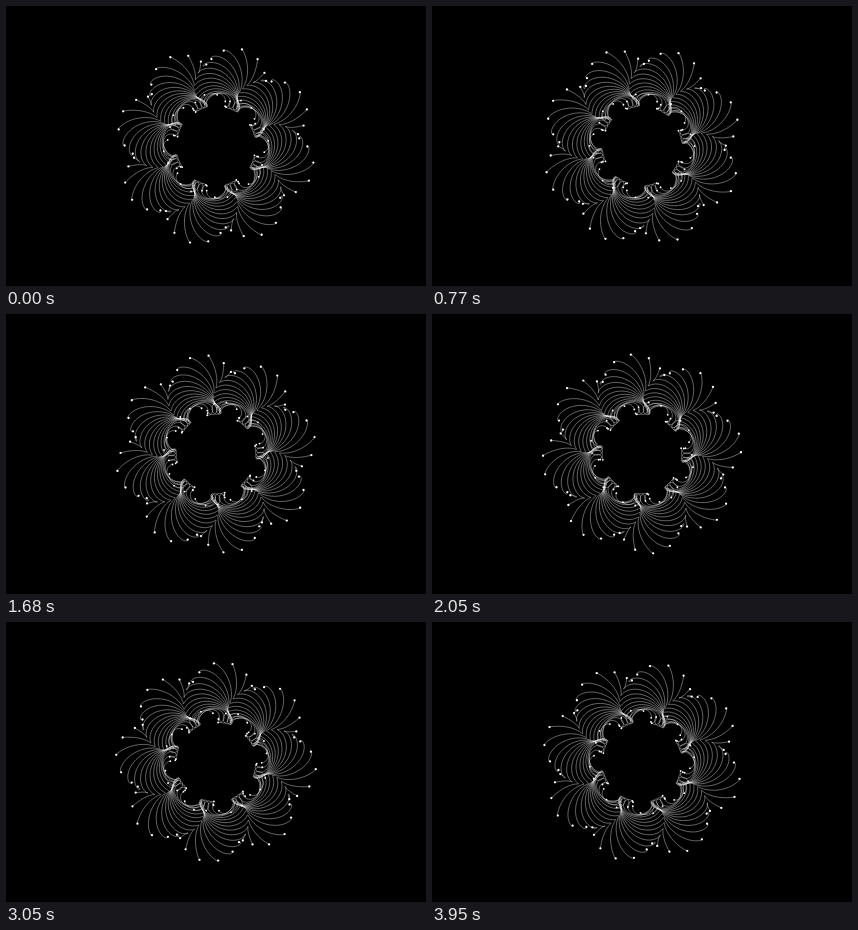
An HTML page with a canvas for the animation above (3.99 s loop, 420 by 280 pixels).

```html
<!DOCTYPE html>
<html lang="en">
<head>
<meta charset="utf-8">
<title>Curling wreath</title>
<style>
html, body { margin: 0; width: 100%; height: 100%; overflow: hidden; background: #000; }
canvas { display: block; width: 420px; height: 280px; }
</style>
</head>
<body>
<canvas width="420" height="280"></canvas>
<script>
const ctx = document.querySelector("canvas").getContext("2d");
const LOOP = 3990, STRANDS = 50, WAVES = 8, STEPS = 200;
const TAU = 2 * Math.PI, RAD = Math.PI / 180;
const FIRST = -2.8 * RAD, CREST = -119.5 * RAD;
const INNER = 46, OUTER = 91, SWEEP = 85 * RAD, TURNS = 1.75, TAIL = -.35;

// A spiral from ring (u = TAIL) to tip (u = 1), with each point circling its place.
function place(angle, phase, u) {
  const w = Math.min(1, (u + Math.sqrt(u * u + .03)) / 2);
  const psi = phase + TAU * TURNS * (1 - u);
  const base = INNER + (OUTER - INNER) * w ** 1.6;
  const a = angle + SWEEP * (1 - w) ** 1.7;
  const r = base + (6.5 + 2.5 * w) * Math.cos(psi);
  const side = 6.5 * Math.sin(psi);
  return [
    r * Math.cos(a) - side * Math.sin(a),
    r * Math.sin(a) + side * Math.cos(a)
  ];
}

function dot([x, y], radius) {
  ctx.beginPath();
  ctx.arc(x, y, radius, 0, TAU);
  ctx.fill();
}

function draw(now) {
  const t = now % LOOP / LOOP;
  ctx.setTransform(1, 0, 0, 1, 0, 0);
  ctx.fillStyle = "#000";
  ctx.fillRect(0, 0, 420, 280);
  ctx.translate(210, 140);
  ctx.fillStyle = "#fff";
  ctx.strokeStyle = "rgba(255, 255, 255, .62)";
  ctx.lineWidth = .65;
  for (let i = 0; i < STRANDS; i++) {
    const angle = FIRST + i * TAU / STRANDS;
    const phase = WAVES * (angle - CREST) - TAU * t;
    ctx.beginPath();
    for (let k = 0; k <= STEPS; k++) {
      ctx.lineTo(...place(angle, phase, TAIL + (1 - TAIL) * k / STEPS));
    }
    ctx.stroke();
    dot(place(angle, phase, TAIL), .9);
    dot(place(angle, phase, 1), 1.15);
  }
}

const start = performance.now();
function tick() {
  draw(performance.now() - start);
  requestAnimationFrame(tick);
}
tick();
</script>
</body>
</html>
```
